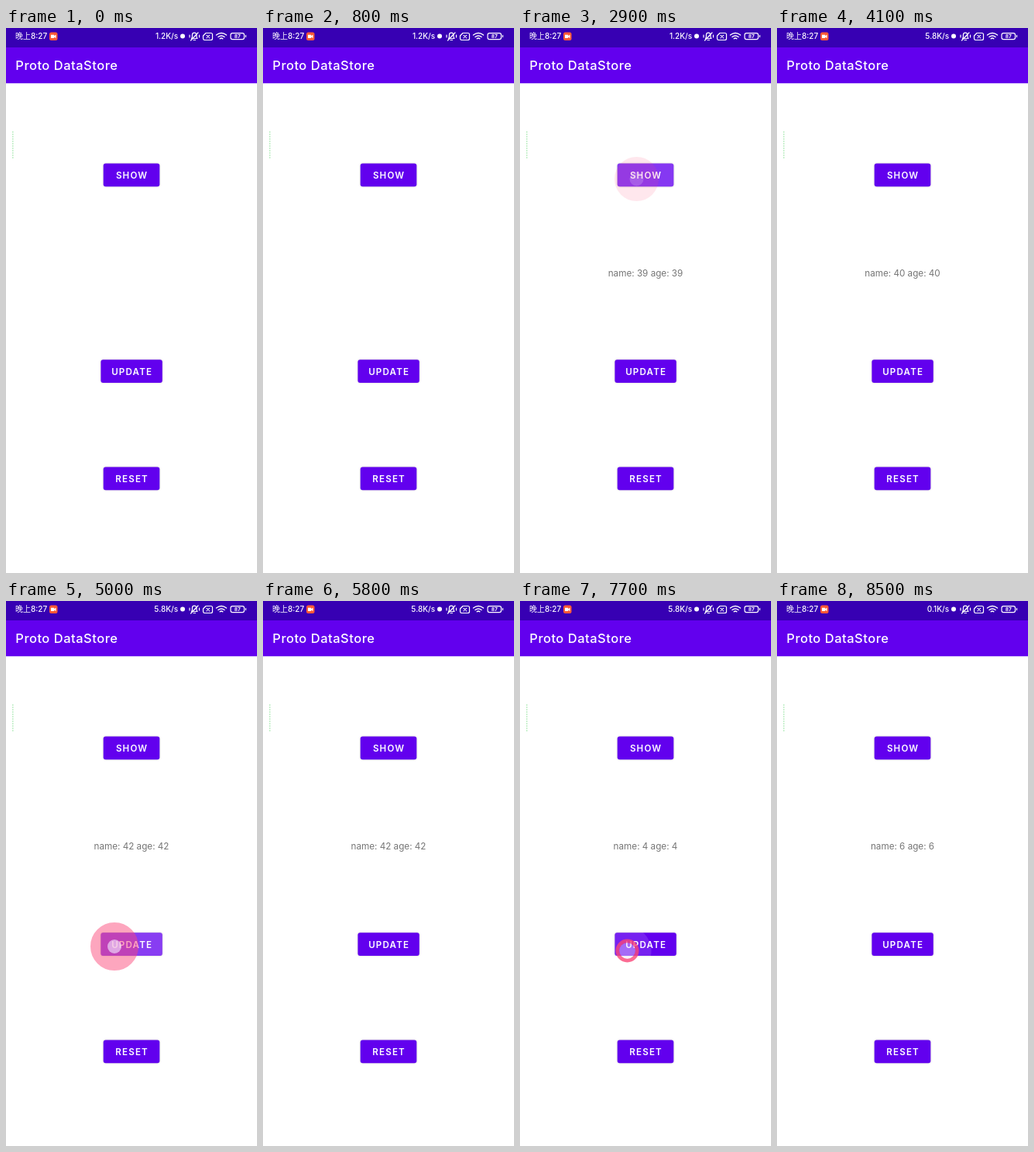
These frames come from a looping animation (324 px wide and 702 px high, 8600 ms). An HTML page:

```html
<!DOCTYPE html>
<html lang="en">
<head>
<meta charset="utf-8">
<title>Proto DataStore</title>
<style>
  html, body { margin: 0; width: 100%; height: 100%; overflow: hidden; background: #fff; }
  svg { display: block; width: 100vw; height: 100vh; }
  text { font-family: Inter, "Noto Sans CJK SC", "Noto Sans CJK", sans-serif; fill: #fff; }
  .status { font-size: 10px; font-weight: 500; }
  .title { font-size: 16.5px; font-weight: 500; letter-spacing: .5px; }
  .label { font-size: 11.55px; font-weight: 600; letter-spacing: 1.2px; text-anchor: middle; }
  .result { font-size: 11.7px; fill: #757575; text-anchor: middle; }
  .icon { fill: none; stroke: #fff; stroke-width: 1.2; stroke-linecap: round; stroke-linejoin: round; }
</style>
</head>
<body>
<svg id="stage" viewBox="0 0 324 702">
  <rect width="324" height="71.2" fill="#6200ee"/>
  <rect width="324" height="25" fill="#3700b3"/>
  <text class="status" x="12" y="14.3">晚上8:27</text>
  <rect x="56" y="5.5" width="10.5" height="10.5" rx="2.5" fill="#ff5a36"/>
  <path d="M58 8.7h4v1.2l2.5-1.2v4.2l-2.5-1.2v1.2h-4z" fill="#fff"/>
  <text class="status" id="speed" x="222.2" y="14.3" text-anchor="end"></text>
  <circle cx="228" cy="10.6" r="3" fill="#fff"/>
  <g class="icon">
    <path d="M239.5 13.5h7.5l-1-1.8V9a2.8 2.8 0 0 0-5.6 0v2.7zM242 15.5h2.5M248 6l-9.500 10M237 9v3M249.500 9v3"/>
    <path d="M258 6.500h6.500q2 0 2 2v5q0 2-2 2h-8q-2 0-2-2V10zM259 9.300l3.600 3.600m0-3.600l-3.600 3.600"/>
    <path d="M271.500 9q6.500-4.800 13 0M274 11.500q4-3 8 0M276.300 13.700q1.700-1.200 3.400 0" stroke-width="1.500"/>
    <rect x="290" y="6.600" width="17.500" height="8" rx="2.300"/>
    <path d="M309.500 9.600v2"/>
  </g>
  <text x="298.700" y="13" font-size="6.500" font-weight="700" text-anchor="middle">87</text>
  <text class="title" x="12.300" y="54.400">Proto DataStore</text>
  <path d="M8.800 133V168" stroke="#c0efc6" stroke-width="1.500" stroke-dasharray="2 1"/>
  <text class="result" id="result" x="162" y="320"></text>
  <g id="buttons"></g>
  <g id="touch" visibility="hidden">
    <circle id="halo" fill="none" stroke="#fa4678"/>
    <circle id="dot" fill="#f2e6ff"/>
  </g>
</svg>
<script>
const LOOP = 8600, STEP = 100, TAP_LIFE = 400;
const byId = id => document.getElementById(id);

const buttons = {
  show:   { label: 'SHOW',   x: 125.7, y: 174.6, w: 72.6 },
  update: { label: 'UPDATE', x: 122.4, y: 427.2, w: 79.4 },
  reset:  { label: 'RESET',  x: 125.7, y: 565.6, w: 72.6 }
};

// start time, button, touch point, value shown after the tap
const tap = (start, button, x, y, value) => ({ start, button, x, y, value });
const taps = [
  tap(2600, 'show', 150.5, 194.5, 39),
  tap(3700, 'update', 140, 446, 40),
  tap(4200, 'update', 140, 446, 41),
  tap(4800, 'update', 140, 445, 42),
  tap(5900, 'reset', 141, 586, 1),
  tap(6700, 'update', 139, 449, 2),
  tap(7000, 'update', 139, 449, 3),
  tap(7300, 'update', 139, 450, 4),
  tap(7700, 'update', 138.5, 450.5, 5),
  tap(8100, 'update', 139, 450, 6)
];

// one value for every 100 ms of a tap
const pose = {
  outer:  [15, 26, 31, 28.5, 27],
  inner:  [10.3, 5, 0, 0, 0],
  halo:   [.8, .62, .48, .13, 0],
  dotR:   [10.3, 9.5, 9, 9, 9],
  dot:    [.38, .6, .62, .2, 0],
  ripple: [31, 65, 90, 90, 90],
  glow:   [.13, .22, .24, .22, 0]
};

byId('buttons').innerHTML = Object.entries(buttons).map(([id, { label, x, y, w }]) => {
  const box = `x="${x}" y="${y}" width="${w}" height="29.7" rx="3"`;
  return `<clipPath id="${id}Clip"><rect ${box}/></clipPath>
    <rect ${box} fill="#6200ee" style="filter:drop-shadow(0 .8px .8px rgba(0,0,0,.2))"/>
    <circle id="${id}Ripple" fill="#fff" clip-path="url(#${id}Clip)" opacity="0"/>
    <text class="label" x="${x + w / 2 + .6}" y="${y + 19.3}">${label}</text>`;
}).join('');

function set(id, attributes) {
  for (const name in attributes) byId(id).setAttribute(name, attributes[name]);
}

function sample(values, age) {
  const p = age / STEP, i = Math.min(Math.floor(p), values.length - 2);
  return values[i] + (values[i + 1] - values[i]) * (p - i);
}

function draw(t) {
  byId('speed').textContent = t < 4000 ? '1.2K/s' : t < 8000 ? '5.8K/s' : '0.1K/s';

  const done = taps.filter(({ start }) => t >= start + 100).pop();
  byId('result').textContent = done ? `name: ${done.value} age: ${done.value}` : '';

  for (const id in buttons) set(id + 'Ripple', { opacity: 0 });
  // the newest tap wins where two overlap
  const active = taps.filter(({ start }) => t >= start && t < start + TAP_LIFE).pop();
  set('touch', { visibility: active ? 'visible' : 'hidden' });
  if (!active) return;

  const at = name => sample(pose[name], t - active.start);
  const center = { cx: active.x, cy: active.y };
  const outer = at('outer'), inner = at('inner');
  set('halo', { ...center, r: (outer + inner) / 2, 'stroke-width': outer - inner, opacity: at('halo') });
  set('dot', { ...center, r: at('dotR'), opacity: at('dot') });
  set(active.button + 'Ripple', { ...center, r: at('ripple'), opacity: at('glow') });
}

const origin = performance.now();
function tick() {
  const t = (performance.now() - origin) % LOOP;
  draw(Math.floor(t / STEP) * STEP);
  requestAnimationFrame(tick);
}
tick();
</script>
</body>
</html>
```
